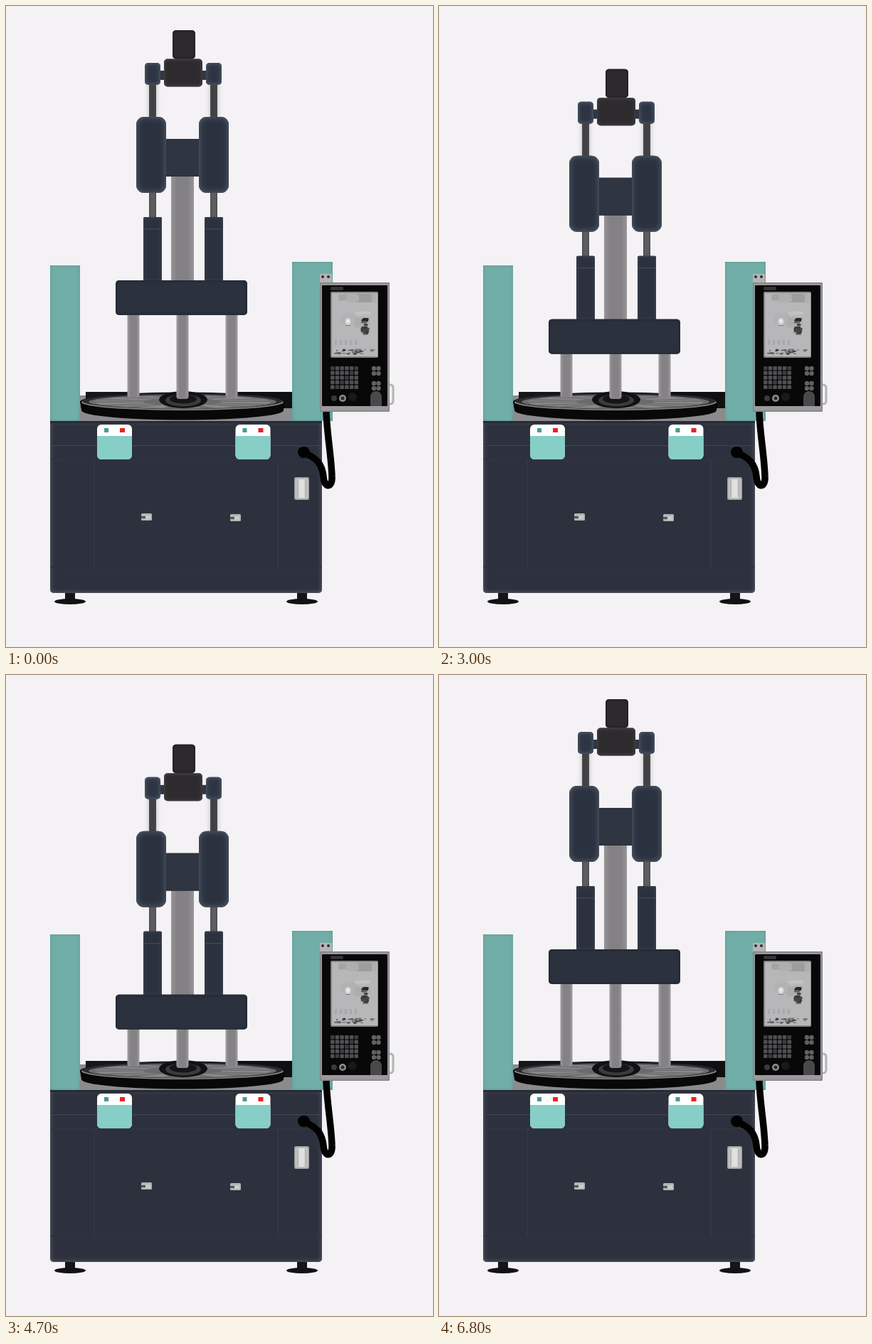
Write an HTML page with a canvas that moves like this. It is 600 by 902 pixels and loops after 8700 ms.

```html
<!DOCTYPE html>
<html lang="en">
<head>
<meta charset="utf-8">
<title>Vertical press</title>
<style>
html, body { margin: 0; width: 100%; height: 100%; overflow: hidden; background: #f4f2f5; }
canvas { display: block; width: 600px; height: 902px; }
</style>
</head>
<body>
<canvas id="stage" width="600" height="902"></canvas>
<script>
const view = document.getElementById('stage').getContext('2d');
const LOOP = 8700, STEP = 100, TRAVEL = 120;
const NAVY = '#2c313d', TEAL = '#71aea8', BLACK = '#080809';
const AXIS = 248, ARM_GAP = 86;
let ctx = view;

const gray = v => `rgb(${v},${v},${v})`;

function rect(x, y, w, h, fill) {
  ctx.fillStyle = fill;
  ctx.fillRect(x, y, w, h);
}

function round(x, y, w, h, r, fill) {
  ctx.beginPath();
  ctx.roundRect(x, y, w, h, r);
  ctx.fillStyle = fill;
  ctx.fill();
}

function oval(x, y, rx, ry, fill) {
  ctx.beginPath();
  ctx.ellipse(x, y, rx, ry, 0, 0, Math.PI * 2);
  ctx.fillStyle = fill;
  ctx.fill();
}

// Rounded block with a soft glow along its inner edge.
function block(x, y, w, h, r, fill, glow, blur) {
  round(x, y, w, h, r, fill);
  ctx.save();
  ctx.clip();
  ctx.beginPath();
  ctx.rect(x - 30, y - 30, w + 60, h + 60);
  ctx.roundRect(x, y, w, h, r);
  ctx.shadowColor = glow;
  ctx.shadowBlur = blur;
  ctx.fill('evenodd');
  ctx.restore();
}

// Upright bar shaded from side to side.
function bar(x, y, w, h, edge, mid, r = 0) {
  const g = ctx.createLinearGradient(x, 0, x + w, 0);
  g.addColorStop(0, edge);
  g.addColorStop(0.25, mid);
  g.addColorStop(0.75, mid);
  g.addColorStop(1, edge);
  round(x, y, w, h, r, g);
}

function seeded(seed) {
  return () => (seed = (seed * 16807) % 2147483647) / 2147483647;
}

// Random flat patches inside a box.
function patches(x, y, w, h, count, size, low, high, rnd) {
  for (let i = 0; i < count; i++) {
    const pw = size * (0.5 + rnd()), ph = size * (0.3 + rnd() * 0.4);
    round(x + rnd() * (w - pw), y + rnd() * (h - ph), pw, ph, 2, gray(low + rnd() * (high - low)));
  }
}

function drawTable() {
  rect(104, 548, 298, 36, '#8b8a8d');
  rect(112, 543, 70, 12, '#171719');
  rect(318, 543, 84, 23, '#101012');

  // Thick disc: the top face pulled down to form its rim.
  for (let d = 0; d <= 12; d++) oval(AXIS, 557 + d, 144 - d / 6, 13.5, BLACK);
  oval(AXIS, 557.5, 142, 11.5, '#8a898b');
  oval(AXIS, 556, 141, 11.5, '#2b2a2c');
  oval(AXIS, 557, 132, 10, '#6b6a6c');

  const sectors = 14;
  for (let i = 0; i < sectors; i++) {
    const a = i / sectors * Math.PI * 2;
    ctx.beginPath();
    ctx.ellipse(AXIS, 557, 124, 9, 0, a, a + 0.3);
    ctx.ellipse(AXIS, 557, 55, 5, 0, a + 0.3, a, true);
    ctx.fillStyle = i % 2 ? '#7d7c7e' : '#89888a';
    ctx.fill();
  }
  oval(AXIS + 1, 554, 34, 12, '#111113');
  oval(AXIS + 1, 555, 25, 8.5, '#3b3a3d');
  oval(AXIS + 1, 553, 19, 6.5, '#151517');
}

function drawSwitch(x) {
  round(x, 589, 49, 49, 6, '#fff');
  round(x, 605, 49, 33, [0, 0, 6, 6], '#87cec7');
  rect(x + 10, 594, 6, 6, '#4a9a94');
  rect(x + 32, 594, 7, 6, '#e5251f');
}

function drawLatch(x, y) {
  round(x, y, 15, 10, 1.5, '#b4b4b4');
  rect(x, y + 4, 6, 3, '#555');
  rect(x + 6, y + 3, 7, 5, '#cbcbcb');
}

function drawBase() {
  for (const x of [90, 416]) {
    rect(x - 7, 824, 14, 13, '#15161a');
    oval(x, 838, 22, 4, '#111216');
  }
  block(62, 584, 382, 242, [0, 0, 5, 5], NAVY, '#606571', 7);
  rect(62, 584, 382, 3, '#262b36');
  for (const y of [618, 638, 790]) {
    rect(63, y - 1, 380, 1, '#282d38');
    rect(63, y, 380, 1, y === 618 ? '#444955' : '#333844');
  }
  for (const x of [123.5, 381.5]) rect(x, 639, 1, 151, '#393e49');
  drawSwitch(128);
  drawSwitch(322.5);
  drawLatch(190, 714);
  drawLatch(315, 715);
  block(405, 663, 21, 32, 3, '#c4c4c4', '#555', 3);
  bar(409, 666, 13, 26, '#a2a2a3', '#e0e0e1', 3);
}

function drawScreen() {
  const rnd = seeded(71);
  round(456, 402, 67, 93, 2, '#858487');
  rect(458, 404, 64, 89, '#b7b6b8');
  patches(459, 405, 62, 12, 6, 20, 155, 180, rnd);
  patches(459, 419, 62, 44, 7, 22, 172, 195, rnd);
  patches(459, 482, 62, 9, 30, 4, 60, 150, rnd);
  oval(480.5, 444, 4, 5, '#d8d7d8');
  rect(479, 442, 3, 3, '#f5f4ed');
  rect(477, 449, 7, 1, '#7c7b7e');
  patches(498, 436, 13, 30, 12, 8, 30, 100, rnd);
  for (let x = 462; x < 495; x += 7) rect(x, 470, 3, 7, '#a8a7a9');
}

function drawPanel() {
  rect(441, 377, 17, 12, '#b5b4b6');
  for (const x of [445, 453]) oval(x, 381, 2, 2, '#302c2e');
  ctx.beginPath();
  ctx.roundRect(533, 533, 11, 27, 4);
  ctx.lineWidth = 3;
  ctx.strokeStyle = '#b4b3b5';
  ctx.stroke();
  block(441, 389, 98, 182, 2, '#9b999c', '#5a585b', 3);
  round(444, 393, 92, 170, 1, BLACK);
  round(456, 395, 18, 5, 2, '#343335');
  drawScreen();

  for (let i = 0; i < 30; i++) {
    round(456 + i % 6 * 6.7, 507 + Math.floor(i / 6) * 6.6, 5.5, 5.5, 1, i % 5 ? '#504f52' : '#3d3c3f');
  }
  for (let i = 0; i < 8; i++) {
    oval(517 + i % 2 * 6.5, 510 + (i >> 1) * 7 + (i >> 2) * 7, 3.2, 3.2, '#626164');
  }
  oval(461, 552, 4, 4, '#39383a');
  oval(473, 552, 5, 5, '#8e8d8f');
  oval(473, 552, 2.5, 2.5, '#29282a');
  oval(487, 550, 6, 6, '#19181a');
  round(512, 542, 16, 21, [8, 8, 1, 1], '#49484b');
}

function drawCable() {
  ctx.beginPath();
  ctx.moveTo(418, 628);
  ctx.bezierCurveTo(438, 637, 444, 645, 446, 662);
  ctx.bezierCurveTo(447, 679, 459, 679, 458, 662);
  ctx.bezierCurveTo(457, 632, 451, 603, 450, 571);
  ctx.lineWidth = 9.5;
  ctx.strokeStyle = '#020203';
  ctx.stroke();
  oval(418.5, 628, 8.5, 8, '#020203');
}

function drawStatic() {
  rect(0, 0, 600, 902, '#f4f2f5');
  drawTable();
  block(62, 365, 42, 219, 0, TEAL, '#5c948f', 4);
  block(402, 360, 57, 224, 0, TEAL, '#5c948f', 4);
  drawBase();
  drawCable();
  drawPanel();
}

function drawArm(dx) {
  ctx.save();
  ctx.shadowColor = 'rgba(60,50,50,.3)';
  ctx.shadowBlur = 7;
  bar(201 + dx, 108, 10, 52, '#4b4a4d', '#424144');
  ctx.restore();
  bar(201 + dx, 258, 10, 42, '#4b4a4d', '#5d5c5f');
  block(195 + dx, 80, 22, 31, 5, '#2d3544', '#5e6878', 6);
  block(193 + dx, 297, 26, 90, [2, 2, 0, 0], '#2b313d', '#414956', 5);
  rect(194 + dx, 313.5, 24, 1, '#49515d');
}

function drawHead() {
  rect(216, 91, 66, 13, '#303744');
  bar(232, 238, 32, 150, '#979597', '#838183');
  for (const dx of [0, ARM_GAP]) drawArm(dx);
  block(222, 74.5, 54, 39, 5, '#2d2b2e', '#514f52', 5);
  block(234, 34, 32, 40.5, 5, '#2c2a2d', '#17161a', 5);
  block(224, 187, 48, 53, 0, '#2f3541', '#292f3a', 4);
  for (const side of [-1, 1]) block(AXIS + side * 44 - 21, 156, 42, 107, 11, '#2b323f', '#5c6573', 9);
  block(154, 386, 185, 49, 5, '#2b313d', '#1c222e', 6);
}

function drawRods(y) {
  const top = 420 + y;
  for (const side of [-1, 0, 1]) {
    const bottom = side ? 551 : 553;
    if (bottom > top) bar(239.5 + side * 69, top, 17, bottom - top, '#a09ea0', '#848284', [0, 0, 4, 4]);
  }
}

// Critically damped spring response.
function spring(ms) {
  const k = Math.max(0, ms) * 0.0056;
  return 1 - (1 + k) * Math.exp(-k);
}

function offsetAt(t) {
  const held = Math.floor(t / STEP) * STEP;
  return TRAVEL * (spring(held - 2725) - spring(held - 4418));
}

const backdrop = document.createElement('canvas');
backdrop.width = 600;
backdrop.height = 902;
ctx = backdrop.getContext('2d');
drawStatic();
ctx = view;

const start = performance.now();
function frame() {
  const y = offsetAt((performance.now() - start) % LOOP);
  ctx.drawImage(backdrop, 0, 0);
  drawRods(y);
  ctx.save();
  ctx.translate(0, y);
  drawHead();
  ctx.restore();
  requestAnimationFrame(frame);
}
frame();
</script>
</body>
</html>
```
